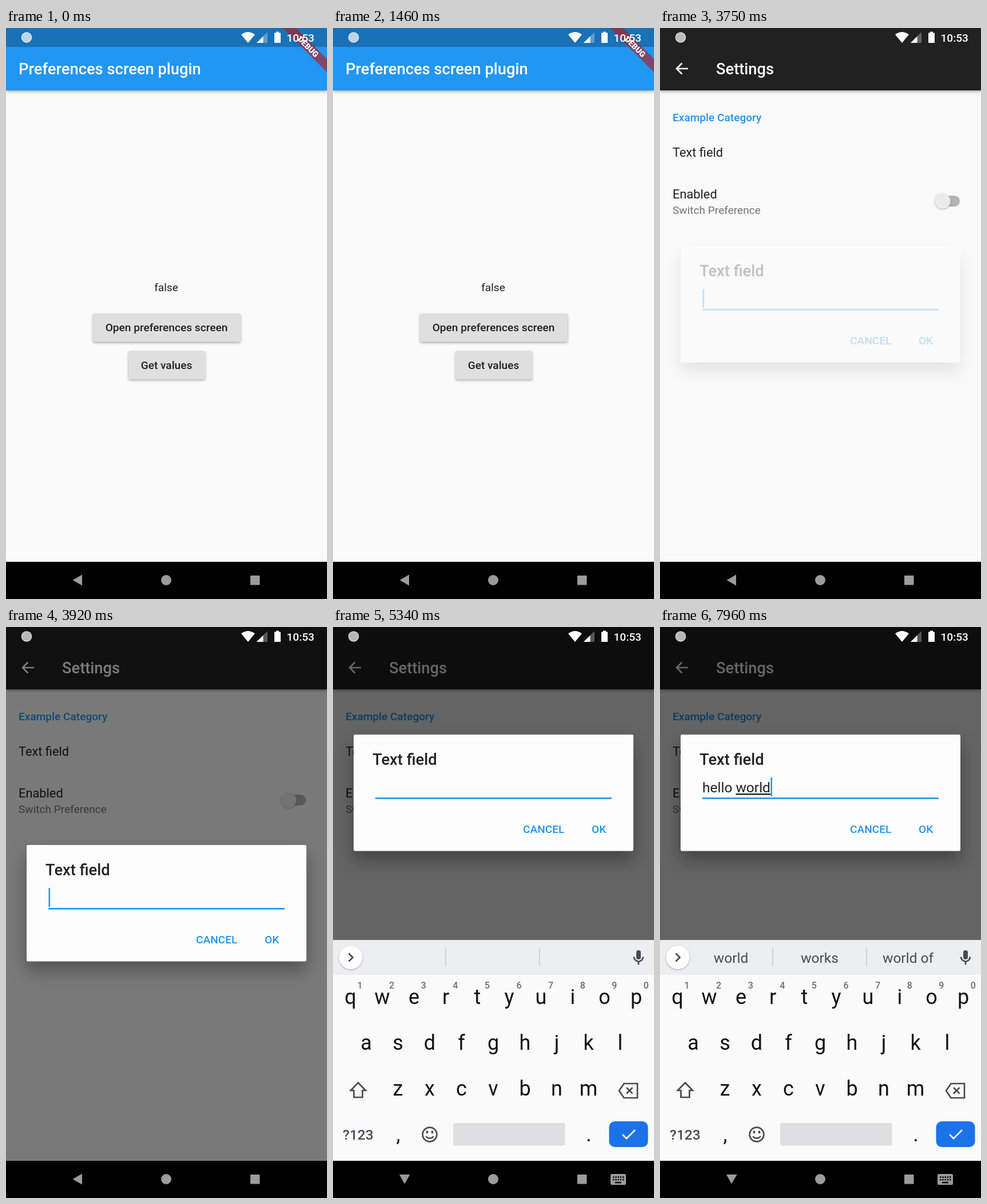
Recreate the animation shown at these times as an HTML page. Size 561 px wide and 998 px high, loop 8 s.

```html
<!DOCTYPE html>
<html lang="en">
<head>
<meta charset="utf-8">
<title>Preferences screen plugin</title>
<style>
html, body { margin: 0; width: 100%; height: 100%; overflow: hidden; background: #000; }
svg { display: block; width: 100vw; height: 100vh; font: 19.1px Roboto, sans-serif; fill: #212121; }
text { white-space: pre; }
.med { font-weight: 500; }
.title { font-size: 27.3px; font-weight: 500; }
.item { font-size: 21.8px; }
.big { font-size: 24.5px; }
.white { fill: #fff; }
.blue { fill: #2196f3; }
.mid { text-anchor: middle; }
.bar { filter: drop-shadow(0 2px 2.5px rgba(0,0,0,.35)); }
.btn { fill: #dfdfdf; filter: drop-shadow(0 2px 2px rgba(0,0,0,.3)); }
.btn.down { filter: drop-shadow(0 4px 5px rgba(0,0,0,.35)); }
.knob { filter: drop-shadow(0 1.5px 1.5px rgba(0,0,0,.3)); }
.sheet { fill: #fdfdfd; filter: drop-shadow(0 16px 15px rgba(0,0,0,.32)); }
.key { font-size: 36px; fill: #101010; text-anchor: middle; }
.hint { font-size: 16px; font-weight: 500; fill: #6b6e72; text-anchor: middle; }
.word { font-size: 24.5px; fill: #484b4f; text-anchor: middle; }
.line { fill: none; stroke: #484b4f; stroke-width: 2.7; }
.done { text-decoration: none; }
.compose { text-decoration: underline; text-decoration-thickness: 1.5px; }
</style>
</head>
<body>
<svg viewBox="0 0 561 998" preserveAspectRatio="none">
  <g id="home">
    <rect width="561" height="933" fill="#fafafa"/>
    <rect class="bar blue" width="561" height="109"/>
    <rect width="561" height="33" fill="#1a71b6"/>
    <text class="title white" x="22" y="81">Preferences screen plugin</text>
    <text class="mid" x="280" y="460">false</text>
    <rect id="open" class="btn" x="152" y="499" width="258" height="49.5" rx="2.7"/>
    <text class="med mid" x="280.5" y="530">Open preferences screen</text>
    <rect class="btn" x="214" y="564.5" width="134" height="49.5" rx="2.7"/>
    <text class="med mid" x="280.5" y="596">Get values</text>
    <g transform="translate(561 0) rotate(45)">
      <rect x="-60" y="38.2" width="120" height="16.4" fill="#b71c1c" fill-opacity=".63"/>
      <text class="white mid" y="51.4" font-size="13.9" font-weight="900">DEBUG</text>
    </g>
  </g>

  <g id="settings">
    <rect width="561" height="933" fill="#fafafa"/>
    <rect class="bar" width="561" height="109"/>
    <path d="M49 71H29M38.5 61.5L29 71L38.5 80.5" fill="none" stroke="#fff" stroke-width="2.7"/>
    <text class="title white" x="98" y="81">Settings</text>
    <text class="med blue" x="22" y="163">Example Category</text>
    <text class="item" x="22" y="225">Text field</text>
    <text class="item" x="22" y="298">Enabled</text>
    <text x="22" y="325" fill="#757575">Switch Preference</text>
    <rect x="484" y="293" width="40" height="19" rx="9.5" fill="#b5b5b5"/>
    <circle class="knob" cx="494" cy="302.5" r="13.6" fill="#ececec"/>
    <rect y="933" width="561" height="65" fill="#000"/>
  </g>

  <rect id="dim" width="561" height="998" fill="#000"/>

  <g id="dialog">
    <rect class="sheet" x="36" y="381" width="489" height="203.5" rx="2.7"/>
    <text class="title" x="69" y="434">Text field</text>
    <text id="field" class="big" x="74" y="482"><tspan class="done"></tspan><tspan class="compose"></tspan></text>
    <rect class="blue" x="74" y="491" width="413" height="2.7"/>
    <rect id="caret" class="blue" y="456" width="2.6" height="33"/>
    <text class="med blue" x="332" y="553">CANCEL</text>
    <text class="med blue" x="452" y="553">OK</text>
  </g>

  <g id="board">
    <rect y="547" width="561" height="451" fill="#fafafa"/>
    <rect y="547" width="561" height="61" fill="#eceef0"/>
    <path d="M197 561V593M361 561V593" stroke="#c6cacd" stroke-width="1.5"/>
    <circle class="knob white" cx="31" cy="577.5" r="20.5"/>
    <path class="line" d="M27.5 570.5L34.5 577.5L27.5 584.5"/>
    <g fill="#484b4f">
      <rect x="530" y="565" width="8" height="16" rx="4"/>
      <path class="line" stroke-width="2" d="M526 576.5a8 8 0 0 0 16 0M534 584.5V590"/>
    </g>
    <g id="words"></g>
    <g id="keys"></g>
    <path class="line" d="M44 796.5L57 810H51.5V822H36.5V810H31Z"/>
    <path class="line" d="M508.5 798H532V823H508.5L500 810.5ZM513 805L523.5 815.5M523.5 805L513 815.5"/>
    <text class="big med" x="17" y="896" fill="#484b4f">?123</text>
    <circle class="line" cx="169" cy="887" r="12.4"/>
    <path class="line" d="M162.5 890a7 5.5 0 0 0 13 0"/>
    <path d="M164.5 880.5v4.5M173.5 880.5v4.5" stroke="#484b4f" stroke-width="3.4"/>
    <rect x="210" y="867" width="195.500" height="39.500" rx="4" fill="#dedfe1"/>
    <rect x="482.500" y="864" width="68" height="45" rx="10" fill="#1a73e8"/>
    <path d="M506 887L513 894L528 879" fill="none" stroke="#fff" stroke-width="2.700"/>
  </g>

  <rect id="navbar" y="933" width="561" height="65" fill="#000"/>
  <g fill="#9b9b9b">
    <path id="back"/>
    <circle cx="280" cy="965" r="9"/>
    <rect x="427" y="957" width="16.500" height="16.500" rx="1"/>
    <g id="switcher">
      <rect x="485" y="956" width="27" height="19" rx="2.500"/>
      <path d="M489 961.500H508.500M489 966H508.500" stroke="#000" stroke-width="2.500" stroke-dasharray="2.500 1.750"/>
      <path d="M493 971H504" stroke="#000" stroke-width="2.500"/>
    </g>
  </g>
  <g class="white">
    <circle cx="36" cy="16.500" r="8.700" fill-opacity=".7" stroke="#fff" stroke-opacity=".75" stroke-width="1.300"/>
    <path d="M423 26L411 11.500Q423 2.500 435 11.500Z"/>
    <path d="M457 7V26H438Z" fill-opacity=".3"/>
    <path d="M449.500 14.500V26H438Z"/>
    <path d="M469 8.500H472V6.500H477V8.500H480V26H469Z"/>
    <text class="med" x="490.500" y="23.500">10:53</text>
  </g>
</svg>
<script>
const $ = id => document.getElementById(id);
const LOOP = 8000, OPEN = 2216, DIALOG = 3713, LIFT = 4905, BOARD = 4930, TYPE = 5440, STEP = 230;
const PHRASE = 'hello world';
const HINTS = { first: ['he', 'hey', 'hello'], second: ['world', 'works', 'world of'] };

const ramp = (t, start, length) => Math.min(1, Math.max(0, (t - start) / length));
const easeOut = (t, start, length, power) => 1 - (1 - ramp(t, start, length)) ** power;
const show = (el, on) => { el.style.display = on ? '' : 'none'; };

function label(parent, cls, x, y, str) {
  const el = document.createElementNS('http://www.w3.org/2000/svg', 'text');
  el.setAttribute('class', cls);
  el.setAttribute('x', x);
  el.setAttribute('y', y);
  el.textContent = str;
  parent.append(el);
  return el;
}

function layer(el, alpha, dy) {
  show(el, alpha > 0);
  el.setAttribute('opacity', alpha);
  el.setAttribute('transform', `translate(0 ${dy})`);
}

['qwertyuiop', 'asdfghjkl', 'zxcvbnm'].forEach((row, r) =>
  [...row].forEach((ch, i) => label($('keys'), 'key', [30.5, 58, 113.5][r] + 55.5 * i, 659 + 80 * r, ch)));
[...'1234567890'].forEach((ch, i) => label($('keys'), 'hint', 47 + 55.6 * i, 632, ch));
label($('keys'), 'key', 114, 899, ',');
label($('keys'), 'key', 447, 899, '.');
const slots = [124, 279, 433.5].map(x => label($('words'), 'word', x, 587, ''));
const [done, compose] = $('field').children;

let typed = -1;
function setTyped(n) {
  if (n === typed) return;
  typed = n;
  const text = PHRASE.slice(0, n), cut = text.indexOf(' ') + 1;
  done.textContent = text.slice(0, cut);
  compose.textContent = text.slice(cut);
  const words = !n ? [] : cut ? HINTS.second : HINTS.first;
  slots.forEach((slot, i) => { slot.textContent = words[i] || ''; });
}

function draw(t) {
  $('open').classList.toggle('down', t > 2120);

  // activity slides up while fading in
  layer($('settings'), easeOut(t, OPEN, 200, 4), 80 * (1 - easeOut(t, OPEN, 350, 5)));
  show($('navbar'), t < OPEN || t > OPEN + 350);

  $('dim').setAttribute('opacity', 0.6 * ramp(t, 3750, 200));
  layer($('dialog'), ramp(t, DIALOG, 150), -193 * easeOut(t, LIFT, 350, 5));
  layer($('board'), easeOut(t, BOARD, 200, 4), 45 * (1 - easeOut(t, BOARD, 300, 5)));

  const keyboard = t >= LIFT - 20;
  $('back').setAttribute('d', keyboard ? 'M116 957H134.5L125 973.5Z' : 'M116.5 965L133 955.500V974.500Z');
  show($('switcher'), keyboard);

  const n = Math.min(PHRASE.length, Math.max(0, Math.floor((t - TYPE) / STEP) + 1));
  setTyped(n);
  const since = t - (n ? TYPE + (n - 1) * STEP : DIALOG);
  $('caret').setAttribute('x', 74.5 + (n && t > DIALOG ? $('field').getComputedTextLength() : 0));
  show($('caret'), since % 1000 < 500);
}

function tick() {
  draw(performance.now() % LOOP);
  requestAnimationFrame(tick);
}
tick();
</script>
</body>
</html>
```
